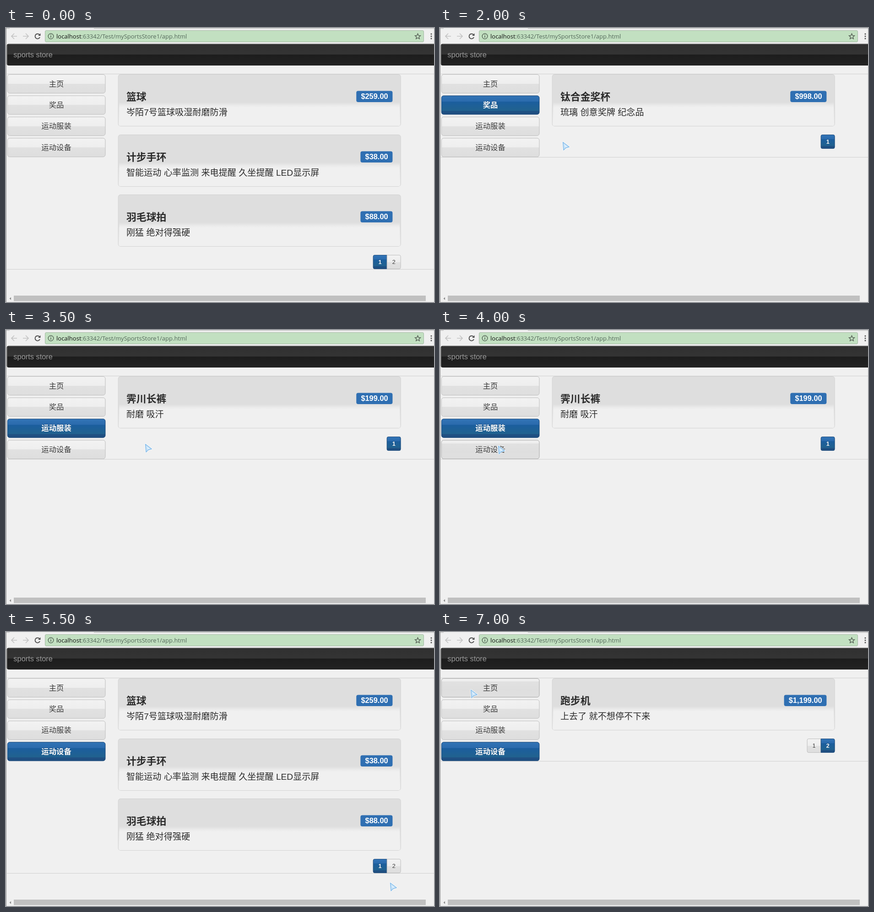
Animation, 935 px wide and 599 px high, one loop 8 s. Source, as an HTML page:

```html
<!DOCTYPE html>
<html lang="zh-CN">
<head>
<meta charset="utf-8">
<title>sports store</title>
<style>
html, body { margin: 0; width: 100%; height: 100%; overflow: hidden; background: #f0f0f0; }
#stage {
  position: absolute; left: 0; top: 0; width: 935px; height: 599px; overflow: hidden;
  font-family: "Liberation Sans", "Noto Sans CJK SC", "Noto Sans CJK", sans-serif; color: #2b2b2b;
}
#stage div, #stage svg { position: absolute; box-sizing: border-box; white-space: nowrap; }
.edge { left: 0; top: 0; width: 1px; height: 599px; background: #999; }
.url {
  left: 85px; top: 5px; width: 828px; height: 26px; padding-left: 24px;
  background: #c2e0c1; border: 1px solid #a5b8a5; border-radius: 3px;
  font: 13px/24px "Open Sans", sans-serif; color: #54685a;
}
.url b { font-weight: 400; color: #111; }
/* the page is laid out at full size and shown slightly reduced */
#page { left: 0; top: 0; transform: translate(2.7px, 100.2px) scale(.91); transform-origin: 0 0; }
.nav {
  left: -1px; top: -72px; width: 1040px; height: 52px; padding-left: 15px;
  border: 1px solid #0c0c0c; border-radius: 4px;
  background: linear-gradient(#303030, #343434 50%, #1d1d1d 50%, #222);
  font-size: 18px; line-height: 50px; color: #999;
}
.rule { left: -1px; width: 1030px; height: 1px; background: #cdcdcd; }
.btn {
  text-align: center; border: 1px solid #bababa; color: #333; text-shadow: 0 1px 0 #fff;
  background: #dfdfdf linear-gradient(#f2f2f2, #eee 50%, #e1e1e1 50%, #dedede) no-repeat 0 0;
}
.btn.hover { border-color: #a0a0a0; background-position: 0 -15px; }
.btn.down {
  border-color: #8c8c8c; background: #d2d2d2;
  box-shadow: inset 0 3px 5px rgba(0, 0, 0, .14);
}
.btn.on {
  color: #fff; font-weight: 700; border-color: #1d4a7a; text-shadow: 0 -1px 0 rgba(0, 0, 0, .25);
  background: #1f4e80 linear-gradient(#3173b5, #2b6bad 30%, #1b5e9e 32%, #21628f 80%, #1f5083 84%, #1f4e80) no-repeat 0 0;
}
.btn.on.hover { background-position: 0 -15px; }
.side { left: 0; width: 236px; height: 46px; border-radius: 6px; font-size: 18px; line-height: 44px; }
.pg { width: 34px; height: 34px; font-size: 14px; line-height: 33px; }
.card {
  left: 266px; width: 679px; height: 125px; border: 1px solid #cdcdcd; border-radius: 6px;
  background: linear-gradient(#dedede 66px, #f0f0f0 119px);
}
.glow { left: 2px; right: 2px; top: 66px; bottom: 0; background: linear-gradient(#dedede, #ebebeb 8px, #f0f0f0 13px); }
.name { left: 19px; top: 39px; font-size: 24px; line-height: 30px; font-weight: 700; }
.info { left: 19px; top: 76px; font-size: 21px; line-height: 30px; }
.price {
  right: 19px; top: 39px; height: 27px; padding: 0 .6em; border-radius: .25em;
  background: #2f6fb2; color: #fff; font-size: 18px; line-height: 27px; font-weight: 700;
}
.thumb { left: 17px; top: 585px; width: 900px; height: 12px; background: #c0c0c0; }
</style>
</head>
<body>
<div id="stage">
  <div class="url"><b>localhost</b>:63342/Test/mySportsStore1/app.html</div>
  <svg width="935" height="36" fill="none">
    <path d="M0 .9H8M192 .9H935" stroke="#b4b4b4"/>
    <path d="M24 18H12M18 12l-6 6l6 6M37 18H49M43 12l6 6l-6 6" stroke="#c4c4c4" stroke-width="1.7"/>
    <path d="M73 14.5A5.4 5.4 0 1 0 74 20" stroke="#505050" stroke-width="2"/>
    <path d="M75.5 11.5V17H70z" fill="#505050"/>
    <circle cx="98" cy="18" r="5.8" stroke="#4a5a4c" stroke-width="1.3"/>
    <path d="M98 17v4.2M98 14.3v1.5" stroke="#4a5a4c" stroke-width="1.5"/>
    <path d="M899.5 12.3l1.7 4 4.3.4-3.3 2.8 1 4.2-3.7-2.2-3.7 2.2 1-4.2-3.3-2.8 4.3-.4z" stroke="#4d554d" stroke-width="1.3"/>
    <path d="M927.7 11.7h2.7v2.7h-2.7zM927.7 16.7h2.7v2.7h-2.7zM927.7 21.7h2.7v2.7h-2.7z" fill="#505050"/>
  </svg>
  <div id="page">
    <div class="nav">sports store</div>
    <div class="rule" style="top:0"></div>
    <div id="view"></div>
  </div>
  <div class="thumb"></div>
  <svg style="left:6px;top:587px" width="6" height="9"><path d="M5 1.5v6l-3.5-3z" fill="#8a8a8a"/></svg>
  <div class="edge"></div>
  <svg id="cursor" width="18" height="22">
    <path d="M1.5 1.5L15.3 12 8 14 3 19z" fill="#bfe0f8" stroke="#fff" stroke-width="3" stroke-linejoin="round"/>
    <path d="M1.5 1.5L15.3 12 8 14 3 19z" fill="#c6e2f8" stroke="#86bce8" stroke-width="1.5" stroke-linejoin="round"/>
    <path d="M4.5 6.5L11 11.5 6.8 12.5z" fill="#e2f1fc"/>
  </svg>
</div>
<script>
const menu = ['主页', '奖品', '运动服装', '运动设备'];
const gear = {
  page: 1, pages: 2,
  items: [
    ['篮球', '$259.00', '岑陌7号篮球吸湿耐磨防滑'],
    ['计步手环', '$38.00', '智能运动 心率监测 来电提醒 久坐提醒 LED显示屏'],
    ['羽毛球拍', '$88.00', '刚猛 绝对得强硬']
  ]
};
const prizes = { page: 1, pages: 1, items: [['钛合金奖杯', '$998.00', '琉璃 创意奖牌 纪念品']] };
const clothes = { page: 1, pages: 1, items: [['霁川长裤', '$199.00', '耐磨 吸汗']] };
const more = { page: 2, pages: 2, items: [['跑步机', '$1,199.00', '上去了 就不想停不下来']] };

// on, hover, down: menu index; pg: hovered page number
const scenes = [
  { at: 0, list: gear },
  { at: 500, list: gear, cur: [307, 383] },
  { at: 1500, list: gear, down: 1, cur: [125, 171] },
  { at: 2000, list: prizes, on: 1, cur: [267, 248] },
  { at: 2500, list: prizes, on: 1, down: 2, cur: [125, 210] },
  { at: 3500, list: clothes, on: 2, cur: [303, 248] },
  { at: 4000, list: clothes, on: 2, hover: 3, cur: [126, 252] },
  { at: 5000, list: gear, on: 3, hover: 3, cur: [120, 253] },
  { at: 5500, list: gear, on: 3, cur: [838, 547] },
  { at: 6500, list: more, on: 3, pg: 2, cur: [843, 513] },
  { at: 7000, list: more, on: 3, hover: 0, cur: [66, 125] }
];
const sideStep = 51, cardStep = 144.5;
const view = document.getElementById('view'), cursor = document.getElementById('cursor');

const box = (cls, style, body) => `<div class="${cls}" style="${style}">${body}</div>`;

const sideBtn = (s, label, i) => {
  const cls = ['on', 'hover', 'down'].filter(k => s[k] === i).join(' ');
  return box('btn side ' + cls, `top:${1 + sideStep * i}px`, label);
};

const card = ([name, price, info], i) => box('card', `top:${1 + cardStep * i}px`,
  box('glow', '', '') + box('name', '', name) + box('price', '', price) + box('info', '', info));

const pager = (s, top) => {
  const { page, pages } = s.list;
  let out = '';
  for (let n = 1; n <= pages; n++) {
    const l = n === 1 ? 4 : 0, r = n === pages ? 4 : 0;
    const cls = 'btn pg' + (n === page ? ' on' : '') + (n === s.pg ? ' hover' : '');
    out += box(cls, `left:${911 - 33 * (pages - n)}px;top:${top}px;border-radius:${l}px ${r}px ${r}px ${l}px`, n);
  }
  return out;
};

function draw(s) {
  const pagerTop = 1 + cardStep * s.list.items.length;
  const bottom = Math.max(pagerTop + 34, 200);
  view.innerHTML = menu.map((m, i) => sideBtn(s, m, i)).join('') +
    box('rule', `top:${bottom}px`, '') +
    s.list.items.map(card).join('') + pager(s, pagerTop);
  cursor.style.display = s.cur ? '' : 'none';
  if (s.cur) {
    cursor.style.left = s.cur[0] + 'px';
    cursor.style.top = s.cur[1] + 'px';
  }
}

let shown = null;
function tick() {
  const t = performance.now() % 8000;
  const s = scenes.filter(c => c.at <= t).pop();
  if (s !== shown) draw(shown = s);
  requestAnimationFrame(tick);
}
tick();
</script>
</body>
</html>
```
